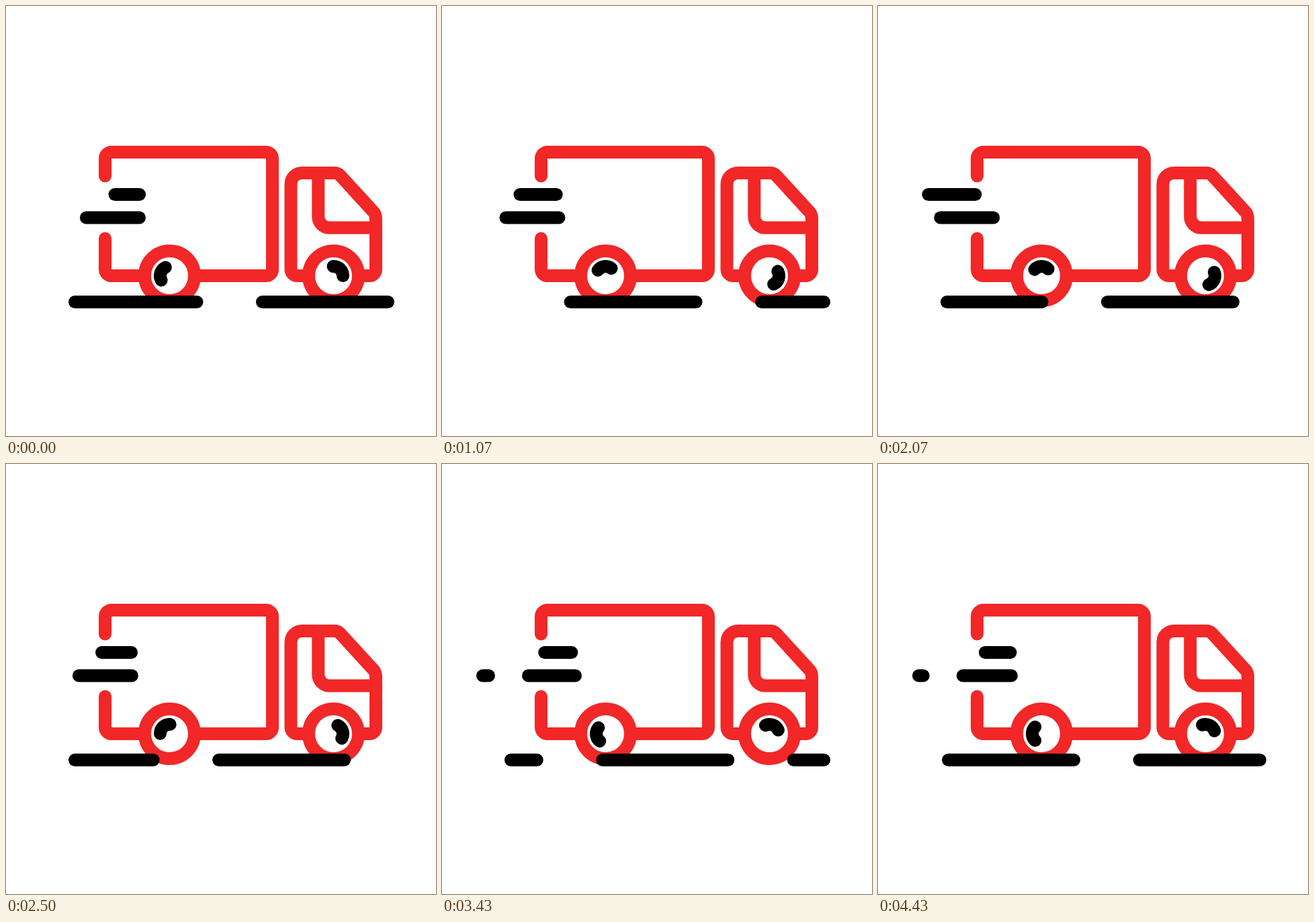
Animation of 640 by 640 pixels, one loop 4.5 s. Source, as an HTML page:

```html
<!DOCTYPE html>
<html lang="en">
<head>
<meta charset="utf-8">
<title>Delivery truck</title>
<style>
  html, body { margin: 0; width: 100%; height: 100%; overflow: hidden; background: #fff; }
  svg { display: block; width: 100%; height: 100%; }
  path, circle { fill: none; stroke-width: 19; stroke-linecap: round; stroke-linejoin: round; }
  .red { stroke: #f22727; }
  .black { stroke: #000; }
  .wheel { fill: #fff; }
</style>
</head>
<body>
<svg viewBox="0 0 640 640">
  <g class="red">
    <path d="M147.5 253V227a9.5 9.5 0 0 1 9.5-9.5H387a9.5 9.5 0 0 1 9.5 9.5V392a9.5 9.5 0 0 1-9.5 9.5H157a9.5 9.5 0 0 1-9.5-9.5V346"/>
    <path d="M440.5 248.5H488.5Q493.5 248.5 497 251.8L547.5 307Q550.5 310.5 550.5 317V392a9.5 9.5 0 0 1-9.5 9.5H433.5a9.5 9.5 0 0 1-9.5-9.5V265a16.5 16.5 0 0 1 16.5-16.5Z"/>
    <path d="M464.8 248.3V313.5a16.5 16.5 0 0 0 16.5 16.5H550.5"/>
    <circle class="wheel" cx="243.5" cy="401.5" r="37"/>
    <circle class="wheel" cx="487.5" cy="401.5" r="37"/>
  </g>
  <g class="black">
    <path id="rearHub"/>
    <path id="frontHub"/>
    <path id="ground" d="M102.5 440.5H568.5" stroke-dasharray="187 97.5"/>
    <path id="wind" d="M60.5 315H198.5" stroke-dasharray="79 59"/>
    <path id="gust"/>
  </g>
</svg>
<script>
  const LOOP = 4500, SHOWN_FPS = 14, BASE_FPS = 25;
  const $ = id => document.getElementById(id);
  const mod = (a, b) => ((a % b) + b) % b;
  const smooth = u => u * u * (3 - 2 * u);

  // Arc of 92 degrees around a wheel centre, drawn facing east.
  const HUB = 14, HALF = 46 * Math.PI / 180;
  const hx = HUB * Math.cos(HALF), hy = HUB * Math.sin(HALF);
  for (const id of ['rearHub', 'frontHub'])
    $(id).setAttribute('d', `M${hx} ${-hy}A${HUB} ${HUB} 0 0 1 ${hx} ${hy}`);

  const turn = (id, x, deg) =>
    $(id).setAttribute('transform', `translate(${x} 401.5) rotate(${mod(deg, 360)})`);

  // Shift a dash pattern so that one dash begins at x = start.
  const slide = (id, left, start, period) =>
    $(id).setAttribute('stroke-dashoffset', mod(left - start, period));

  function draw(n) {
    const spin = 29.03 * n;
    turn('rearHub', 243.5, 198 + spin);
    turn('frontHub', 487.5, -46 + spin);
    slide('ground', 102.5, 97 - 28.125 * n, 284.5);
    slide('wind', 60.5, 119.4 - 11.127 * n, 138);

    // Eased swing: 11 base frames out, 11 back.
    const m = n % 22;
    const p = smooth((m < 11 ? m : 22 - m) / 11);
    $('gust').setAttribute('d', `M${162 - 106.5 * p} 280.5H${198.6 - 65.7 * p}`);
  }

  const origin = performance.now();
  function tick() {
    const t = Math.floor(mod(performance.now() - origin, LOOP) / 10) * 10;
    const step = Math.min(62, Math.floor((t + 5) * SHOWN_FPS / 1000));
    draw(Math.ceil(step * BASE_FPS / SHOWN_FPS));
    requestAnimationFrame(tick);
  }
  draw(0);
  requestAnimationFrame(tick);
</script>
</body>
</html>
```
